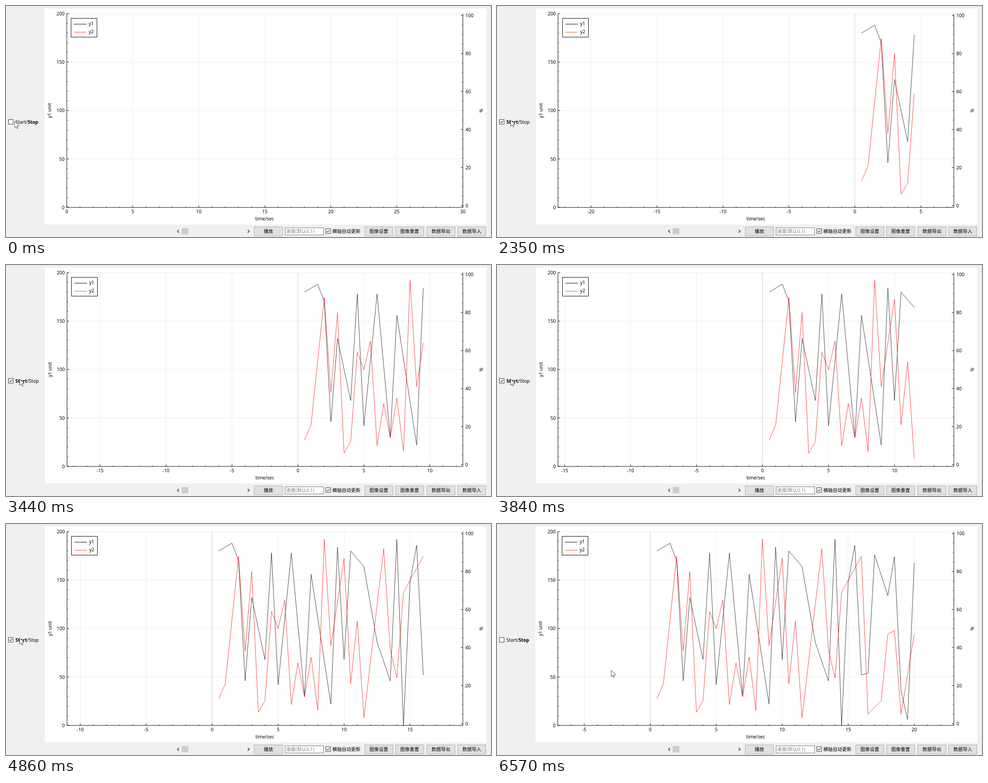
An HTML page with a canvas for the animation above (6.67 s loop, 1085 px wide and 516 px high).

```html
<!DOCTYPE html>
<html lang="zh">
<head>
<meta charset="utf-8">
<title>Live chart</title>
<style>
html, body { margin: 0; width: 100%; height: 100%; overflow: hidden; background: #f0f0f0; }
canvas { display: block; }
</style>
</head>
<body>
<canvas id="stage" width="1085" height="516"></canvas>
<script>
const LOOP = 6670, START = 1330, STOP = 5760, FRAME = 100;
const FIRST_SAMPLE = 1430, SAMPLE_GAP = 108, SAMPLES = 40, SPAN = 30;
const TOP = 17, BOTTOM = 450, RIGHT = 1022;
const FONT = '10.5px "Noto Sans", "Noto Sans CJK SC", "Noto Sans CJK", sans-serif';
const c = document.getElementById('stage').getContext('2d');
const arrow = new Path2D('M0 0V14L3.2 11L5.5 16L7.5 15.1L5.3 10.3L10 10Z');

const clamp = (v, lo, hi) => Math.min(hi, Math.max(lo, v));
const mix = (a, b, k) => a + (b - a) * k;
const snap = v => Math.floor(v) + 0.5;
const left = v => mix(BOTTOM, TOP, v / 200);
const right = v => mix(BOTTOM, TOP, (v + 1) / 102);

// Turning points in percent; each gap is filled along a straight line.
const y1 = fill([90, , 94, 85, 23, 66, , 34, 89, 21, , 89, , 15, 78, , , 11, 92, 34,
  90, , 82, , 43, , 23, 96, 0, 74, 93, 26, 27, 88, , 67, 87, 18, 3, 84]);
const y2 = fill([13, 21, , 88, 38, 80, 6, 12, 59, 50, 65, 10, 32, 14, 35, 7, 97, 41, , 87,
  21, 54, 3, , , 92, 39, 24, 69, , , 88, 5, , 12, 47, 49, 5, , 47]);

function fill(keys) {
  const known = Object.keys(keys).map(Number);
  return Array.from(keys, (v, i) => {
    if (i in keys) return v;
    const b = known.find(k => k > i), a = known[known.indexOf(b) - 1];
    return mix(keys[a], keys[b], (i - a) / (b - a));
  });
}

// Pointer glides, each made in a few equal jumps.
const glides = [
  { start: 100, jumps: 2, x: 19.5, y: 261 },
  { start: 400, jumps: 2, x: 8.5, y: 252 },
  { start: 920, jumps: 4, x: 30.5, y: 254.5 },
  { start: 6470, jumps: 2, x: 255.5, y: 327 },
];

function pointerAt(t) {
  let x = 19.5, y = 258;
  for (const g of glides) {
    const k = clamp(Math.floor((t - g.start) / FRAME) + 1, 0, g.jumps) / g.jumps;
    x = mix(x, g.x, k);
    y = mix(y, g.y, k);
  }
  return [x, y];
}

function path(points, color, width = 1) {
  c.beginPath();
  for (const [x, y] of points) c.lineTo(x, y);
  c.strokeStyle = color;
  c.lineWidth = width;
  c.stroke();
}

const line = (xa, ya, xb, yb, color = '#000', width = 1) => path([[xa, ya], [xb, yb]], color, width);

function box(x, y, w, h, color, border) {
  c.fillStyle = color;
  c.fillRect(x, y, w, h);
  if (!border) return;
  c.strokeStyle = border;
  c.lineWidth = 1;
  c.strokeRect(x, y, w, h);
}

function text(s, x, y, align = 'left', color = '#000', weight = 400) {
  c.font = weight + ' ' + FONT;
  c.textAlign = align;
  c.fillStyle = color;
  c.fillText(s, x, y);
  return x + c.measureText(s).width;
}

function turned(s, x, y, angle, weight) {
  c.save();
  c.translate(x, y);
  c.rotate(angle);
  text(s, 0, 3.8, 'center', '#000', weight);
  c.restore();
}

function checkbox(x, y, on) {
  box(x, y, 10.5, 10.5, '#fff', '#333');
  if (on) path([[x + 2.3, y + 5.2], [x + 4.4, y + 7.6], [x + 8.7, y + 2.8]], '#222', 1.1);
}

function button(label, x) {
  box(x, 493.5, 63, 20, '#e1e1e1', '#adadad');
  text(label, x + 31.5, 507.3, 'center');
}

const chevron = (x, dx) => path([[x, 500], [x + dx, 503.2], [x, 506.4]], '#333', 1.5);

function controls(running) {
  checkbox(5.5, 253.5, running);
  const x = text(running ? 'Start' : 'Start/', 21, 262.5, 'left', '#000', running ? 700 : 400);
  text(running ? '/Stop' : 'Stop', x, 262.5, 'left', '#000', running ? 400 : 700);

  box(393, 496, 15, 14, '#cdcdcd');
  chevron(387, -3.5);
  chevron(540.7, 3.5);
  button('播放', 555.5);
  box(624.5, 495.5, 86, 16, '#fff', '#7a7a7a');
  text('速度(默认0.1)', 626.5, 507.3, 'left', '#808080');
  checkbox(715.5, 497.5, true);
  text('横轴自动更新', 730, 507.3);
  ['图像设置', '图像重置', '数据导出', '数据导入'].forEach((s, i) => button(s, snap(802 + i * 69.6)));
}

function chart(n, shift) {
  const x0 = 136 + shift / 2;
  const lo = n ? n / 2 + 3 - SPAN : 0;
  const px = v => mix(x0, RIGHT, (v - lo) / SPAN);
  box(86 + shift, 5.5, 988.5 - shift, 482.5, '#fff');

  // Grid
  c.setLineDash([1, 2]);
  for (let v = 50; v <= 200; v += 50) line(x0, snap(left(v)), RIGHT, snap(left(v)), '#c8c8c8');
  for (let v = Math.ceil(lo / 5) * 5; v <= lo + SPAN; v += 5)
    if (v) line(snap(px(v)), TOP, snap(px(v)), BOTTOM, '#c8c8c8');
  c.setLineDash([]);
  if (lo < 0) line(px(0), TOP, px(0), BOTTOM, '#c8c8c8');

  // Data
  const trace = (data, y, color) =>
    path(data.slice(0, n).map((v, i) => [px((i + 1) / 2), y(v)]), color, 0.75);
  c.lineJoin = 'bevel';
  trace(y1, v => left(v * 2), '#000');
  trace(y2, right, '#f00');
  c.lineJoin = 'miter';

  // Axes
  line(x0, TOP, x0, BOTTOM);
  line(RIGHT, TOP, RIGHT, BOTTOM);
  line(x0, BOTTOM, RIGHT, BOTTOM);
  for (let v = Math.ceil(lo); v <= lo + SPAN; v++) {
    const major = v % 5 === 0, x = px(v);
    line(x, BOTTOM, x, BOTTOM - (major ? 4.5 : 2));
    if (major) text(String(v), x, 463, 'center');
  }
  for (let v = 0; v <= 200; v += 10) {
    const major = v % 50 === 0, y = left(v);
    line(x0, y, x0 + (major ? 4.5 : 2), y);
    if (major) text(String(v), x0 - 5, y + 3.8, 'right');
  }
  for (let v = 0; v <= 100; v += 5) {
    const major = v % 20 === 0, y = right(v);
    line(RIGHT, y, RIGHT - (major ? 4.5 : 2), y);
    if (major) text(String(v), 1028 - shift / 2, y + 3.8);
  }
  text('time/sec', 578.5 + shift / 2, 479, 'center');
  turned('y1 unit', 97.5 + shift / 2, 233.5, -Math.PI / 2, 500);
  turned('%', 1063 - shift / 2, 233.5, Math.PI / 2);

  // Legend
  box(145.5 + shift, 27.5, 58, 42, '#fff', '#000');
  ['#000', '#dd5522'].forEach((color, i) => {
    const y = 40.5 + i * 18;
    line(152 + shift, y, 180 + shift, y, color);
    text('y' + (i + 1), 185 + shift, y + 2.5);
  });
}

function mouse(t) {
  const [x, y] = pointerAt(t);
  if ([START, STOP].some(s => t >= s && t < s + 2 * FRAME)) {
    c.beginPath();
    c.arc(x, y, 10, 0, 2 * Math.PI);
    c.fillStyle = 'rgba(255, 255, 0, 0.47)';
    c.fill();
  }
  c.save();
  c.translate(x, y);
  c.fillStyle = '#fff';
  c.fill(arrow);
  c.strokeStyle = '#222';
  c.lineWidth = 0.8;
  c.stroke(arrow);
  c.restore();
}

function draw(t) {
  const running = t >= START && t < STOP;
  const n = clamp(Math.floor((t - FIRST_SAMPLE) / SAMPLE_GAP) + 1, 0, SAMPLES);
  box(0, 0, 1085, 516, '#f0f0f0');
  line(0, 0.5, 1085, 0.5, '#e2e2e2');
  line(1084.5, 0, 1084.5, 516, '#e2e2e2');
  chart(n, running ? 1 : 0);
  controls(running);
  mouse(t);
}

const began = performance.now();
function tick() {
  draw((performance.now() - began) % LOOP);
  requestAnimationFrame(tick);
}
tick();
</script>
</body>
</html>
```
